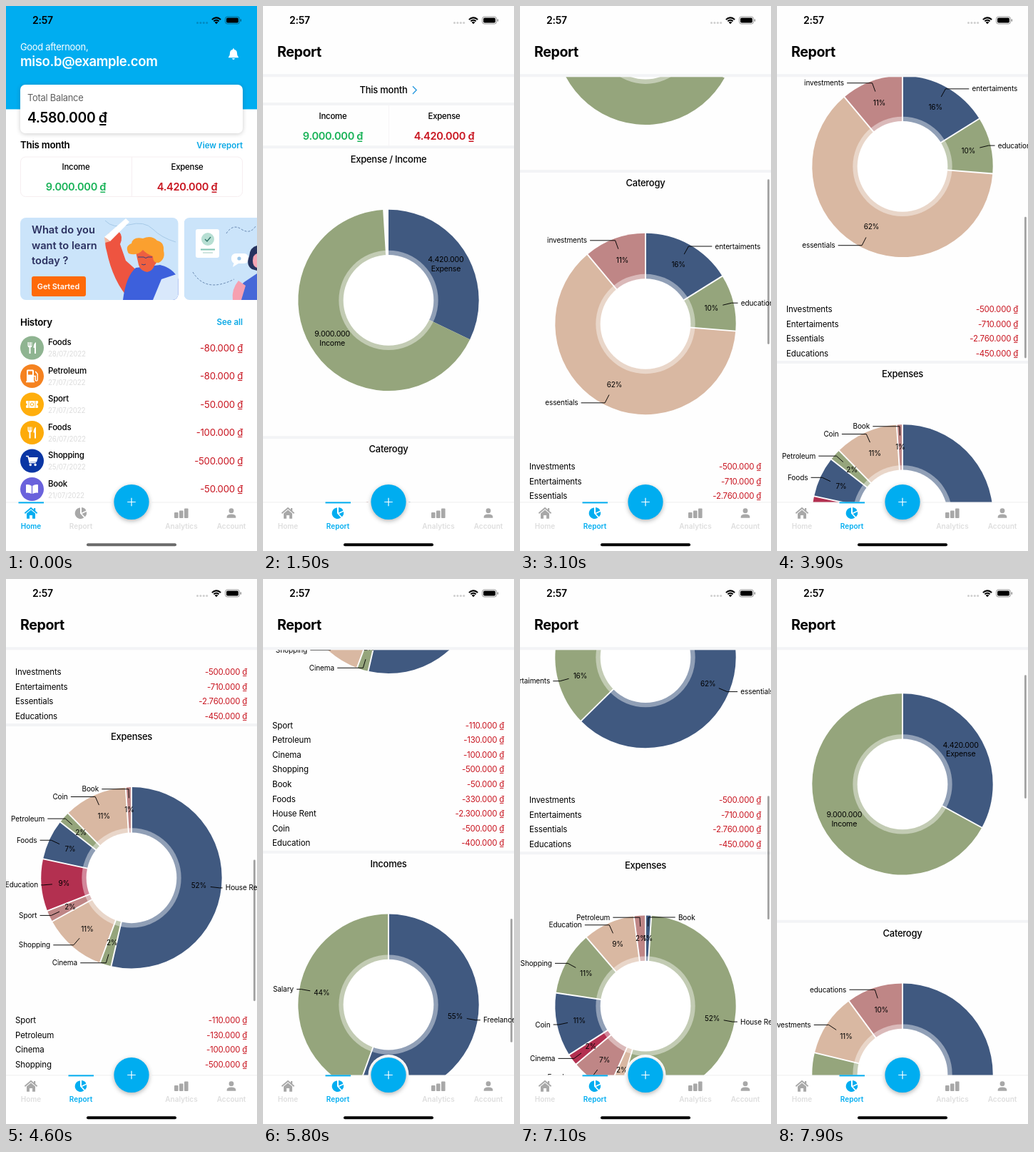
Write an HTML page with a canvas that moves like this. It is 352 px wide and 762 px high and loops after 8 s.

```html
<!DOCTYPE html>
<html lang="en">
<head>
<meta charset="utf-8">
<title>Budget app</title>
<style>
html, body { margin: 0; width: 100%; height: 100%; overflow: hidden; background: #fff; }
canvas { display: block; width: 352px; height: 762px; }
</style>
</head>
<body>
<canvas id="stage"></canvas>
<script>
const W = 352, H = 762, LOOP = 8000;
const SWITCH = 1100, REORDER = 6050;
const BLUE = '#00adf0', RED = '#c8141f', GREEN = '#18b257';
const PASTEL = ['#405980', '#95a57c', '#d9b8a2', '#bf8686', '#b33050'];

const canvas = document.getElementById('stage');
const c = canvas.getContext('2d');
const dpr = window.devicePixelRatio || 1;
canvas.width = W * dpr;
canvas.height = H * dpr;

// ---------- drawing helpers ----------
function text(s, x, y, size, color = '#000', weight = 400, align = 'left', track = -0.02) {
  c.font = `${weight} ${size}px Inter, Roboto, sans-serif`;
  c.letterSpacing = track * size + 'px';
  c.textAlign = align;
  c.fillStyle = color;
  c.fillText(s, x, y + size * 0.36);
}
function rect(x, y, w, h, color) {
  c.fillStyle = color;
  c.fillRect(x, y, w, h);
}
function box(x, y, w, h, r, color, stroke) {
  c.beginPath();
  c.roundRect(x, y, w, h, r);
  if (color) { c.fillStyle = color; c.fill(); }
  if (stroke) { c.strokeStyle = stroke; c.lineWidth = 1; c.stroke(); }
}
function disc(x, y, r, color) {
  c.beginPath();
  c.arc(x, y, r, 0, 7);
  c.fillStyle = color;
  c.fill();
}
function fill(d, color) {
  c.fillStyle = color;
  c.fill(new Path2D(d));
}
function line(d, color, width = 1) {
  c.strokeStyle = color;
  c.lineWidth = width;
  c.stroke(new Path2D(d));
}
function at(x, y, draw) {
  c.save();
  c.translate(x, y);
  draw();
  c.restore();
}
function shadow(blur, dy, color) {
  c.shadowBlur = blur * dpr;
  c.shadowOffsetY = dy * dpr;
  c.shadowColor = color;
}
function clip(x, y, w, h, draw, r = 0) {
  c.save();
  c.beginPath();
  c.roundRect(x, y, w, h, r);
  c.clip();
  draw();
  c.restore();
}

// ---------- icons, centred on 0,0 ----------
const icons = {
  fork() {
    fill('M-6 -8v5q0 2 2 2.5V8h2V-.5q2 -.5 2 -2.5v-5h-1v5h-1v-5h-1.6v5h-1v-5z', '#fff');
    fill('M5.5 -8q-3.5 2 -3.5 8h1.5v8h2z', '#fff');
  },
  pump() {
    box(-7.5, -9, 10, 17, 1.5, '#fff');
    rect(-5.5, -7, 6, 5, '#f58220');
    rect(-8.5, 7, 12, 1.8, '#fff');
    line('M2.5 0h2.2v5q0 1.6 1.5 1.6t1.5 -1.6v-8l-3 -3.5', '#fff', 1.4);
  },
  ticket() {
    box(-8.5, -5, 17, 10, 1, '#fff');
    disc(-8.5, 0, 1.6, '#ffae0c');
    disc(8.5, 0, 1.6, '#ffae0c');
    c.strokeStyle = '#ffae0c';
    c.lineWidth = 1;
    c.beginPath(); c.arc(0, 0, 2.2, 0, 7); c.stroke();
    line('M-4.5 -5v10M4.5 -5v10', '#ffae0c', 0.8);
  },
  cart() {
    line('M-8.5 -6.5h3l2.2 9h8.5', '#fff', 1.5);
    fill('M-5 -5h13.5l-2 6.5h-10z', '#fff');
    disc(-2.2, 5.5, 1.7, '#fff');
    disc(4.6, 5.5, 1.7, '#fff');
  },
  book() {
    fill('M-.6 -4.5Q-4 -7 -8.5 -6.2V5.2Q-4 4.6 -.6 6.6z', '#fff');
    fill('M.6 -4.5Q4 -7 8.5 -6.2V5.2Q4 4.6 .6 6.6z', '#fff');
  },
  home(color) {
    line('M-8.6 .2L0 -7l8.6 7.2', color, 1.8);
    rect(4, -7, 2.2, 4, color);
    fill('M-6 .6L0 -4.4L6 .6V7.8H2V3h-4v4.8h-4z', color);
  },
  chart(color) {
    fill('M-1 .4V-7.4A7.7 7.7 0 1 0 4.3 6.2z', color);
    fill('M1 -8A7.6 7.6 0 0 1 7.4 -3.6L1 -.6z', color);
    fill('M1.6 .9L7.9 -2A7.6 7.6 0 0 1 5.8 5.2z', color);
  },
  bars(color) {
    box(-10, -1, 5.6, 8, 1, color);
    box(-3, -3.5, 5.6, 10.5, 1, color);
    box(4, -6.5, 5.6, 13.5, 1, color);
  },
  person(color) {
    disc(0, -3.3, 3.4, color);
    fill('M-6.3 6.8V5Q-6 1.4 0 1.4T6.3 5V6.8z', color);
  }
};

// ---------- shared chrome ----------
function statusBar(dots) {
  text('2:57', 37, 20, 14, '#000', 600);
  for (let i = 0; i < 4; i++) disc(268.5 + i * 4.4, 23.5, 1.5, dots);
  [[8.1, 2.1], [4.8, 2]].forEach(([r, w]) => {
    c.beginPath();
    c.arc(295, 24.5, r, -Math.PI * 0.77, -Math.PI * 0.23);
    c.strokeStyle = '#000';
    c.lineWidth = w;
    c.stroke();
  });
  fill('M295 25.3l-2.4 -2.6q2.4 -2 4.8 0z', '#000');
  box(307.5, 15, 20, 10, 3, null, 'rgba(0,0,0,.4)');
  box(309, 16.5, 17, 7, 1.8, '#000');
  box(328.6, 18.2, 1.4, 3.6, 0.7, 'rgba(0,0,0,.45)');
}

const TABS = [['Home', 35, 'home'], ['Report', 105, 'chart'], ['Analytics', 246, 'bars'], ['Account', 316, 'person']];
function tabBar(active, grip) {
  rect(0, 694, W, 68, '#fff');
  rect(0, 693.5, W, 1, '#efefef');
  disc(176, 693.5, 28.5, '#fff');
  TABS.forEach(([name, x, icon], i) => {
    const on = i === active;
    if (on) rect(x - 17.5, 693.4, 35.5, 2, BLUE);
    at(x, 709, () => icons[icon](on ? BLUE : '#a8a8a8'));
    text(name, x, 727.5, 10, on ? BLUE : '#dedede', 600, 'center', 0);
  });
  c.save();
  shadow(6, 2, 'rgba(0,0,0,.3)');
  disc(176, 693.5, 24.6, BLUE);
  c.restore();
  line('M170.2 693.5h11.6M176 687.7v11.6', '#fff', 1.2);
  box(113, 751.2, 126, 4, 2, grip);
}

function totals(y) {
  text('Income', 98, y, 11.4, '#000', 500, 'center');
  text('Expense', 254, y, 11.4, '#000', 500, 'center');
  text('9.000.000 ₫', 98, y + 28, 14.6, GREEN, 600, 'center');
  text('4.420.000 ₫', 254, y + 28, 14.6, RED, 600, 'center');
}

// ---------- home ----------
function learnCard() {
  rect(20, 296, 222, 115, '#cbe4fa');
  line('M139 300Q150 312 172 306T206 312T238 330', '#9dc3e3', 0.8);
  // raised arm with a pencil
  fill('M141 342Q136 326 145 317L158 315Q165 322 160 333L168 356L186 372L182 411H174Q150 386 141 342z', '#ee5440');
  fill('M138 323L168 297L173 302L146 329z', '#fff');
  fill('M138 323L146 329L139 331z', '#f4b9a0');
  // shirt and sheet
  fill('M164 411Q168 378 182 366L216 362Q234 366 242 382V411z', '#3d60dc');
  fill('M206 411L218 382L242 374V411z', '#d9e8fb');
  // head
  fill('M182 344Q186 334 198 336L213 342Q215 356 208 363Q206 370 198 372Q188 370 186 362z', '#ee5f40');
  fill('M172 346Q166 336 176 332Q178 322 192 325Q204 320 212 328Q222 330 221 342Q224 354 214 359Q206 360 206 350Q196 346 192 341Q184 350 172 346z', '#fba02f');
  line('M185 351h8q3 3 6 0h6M190 361q3 2 6 0', '#33407e', 1);
  ['What do you', 'want to learn', 'today ?'].forEach((s, i) =>
    text(s, 36, 313 + i * 21.3, 14.6, '#2b3060', 600, 'left', 0));
  box(36, 378, 76, 28, 3, '#ff6a08');
  text('Get Started', 73.5, 392, 10.8, '#fff', 600, 'center', 0);
}
function secondCard() {
  rect(250, 296, 110, 115, '#cbe4fa');
  c.save();
  c.setLineDash([3, 2]);
  line('M309 318Q318 304 330 312T350 308M262 372Q280 402 320 382', '#4d6f9c', 0.8);
  c.restore();
  box(266, 312, 33, 40, 3, '#fff');
  disc(283, 326, 9, '#b7dfd3');
  line('M279 326l3 3l5 -6', '#33766a', 1.4);
  rect(273, 339.5, 20, 2, '#7fc4b2');
  rect(276, 344, 14, 2, '#cfe5df');
  box(316, 346, 24, 14, 6, '#fff');
  fill('M320 358l-2 7l8 -5z', '#fff');
  disc(327, 353, 2.6, '#9cc7ea');
  fill('M352 335Q342 337 341 350Q336 362 345 368L352 370z', '#26335f');
  fill('M352 346Q346 348 346 356T352 366z', '#f6a6b4');
  fill('M318 411Q322 396 334 386L352 374V411z', '#4668d8');
  fill('M318 411Q316 396 326 384L336 391L330 411z', '#f6a0b0');
}

const HISTORY = [
  ['Foods', '28/07/2022', '80.000', '#8fb491', 'fork'],
  ['Petroleum', '27/07/2022', '80.000', '#f58220', 'pump'],
  ['Sport', '27/07/2022', '50.000', '#ffae0c', 'ticket'],
  ['Foods', '26/07/2022', '100.000', '#fdab0a', 'fork'],
  ['Shopping', '25/07/2022', '500.000', '#0a36a4', 'cart'],
  ['Book', '21/07/2022', '50.000', '#6a62dc', 'book']
];

function home() {
  rect(0, 0, W, H, '#fff');
  rect(0, 0, W, 144.4, BLUE);
  statusBar('rgba(0,60,90,.3)');
  text('Good afternoon,', 20, 57, 12.9, '#fff');
  text('miso.b@example.com', 20, 77, 18.5, '#fff', 600);
  fill('M312 71.5q2 -1.5 2 -5.5q0 -4.5 4 -5.3q0 -1.4 1 -1.4t1 1.4q4 .8 4 5.3q0 4 2 5.5v.7h-14zM317 73.2h4q-.5 1.8 -2 1.8t-2 -1.8z', '#fff');

  c.save();
  shadow(6, 1, 'rgba(0,0,0,.2)');
  box(20, 110, 312, 68, 7, '#fff');
  c.restore();
  text('Total Balance', 30, 128.5, 12.9, '#606060');
  text('4.580.000 ₫', 30, 156.5, 19.4, '#000', 600);

  text('This month', 20, 194.5, 13.3, '#000', 600);
  text('View report', 332, 194.5, 11.5, '#0ba9e6', 600, 'right', 0);
  box(20.5, 211, 311, 55.5, 7, '#fff', '#f6eef0');
  rect(176, 211, 1, 56, '#f6eef0');
  totals(225);

  clip(20, 296, 221.5, 115, learnCard, 8);
  clip(249.5, 296, 130, 115, secondCard, 8);

  text('History', 20, 442, 13.3, '#000', 600);
  text('See all', 332, 442, 11.5, '#0ba9e6', 600, 'right', 0);
  HISTORY.forEach(([name, date, sum, color, icon], i) => {
    const y = 478 + i * 39.5;
    disc(36.5, y, 16.5, color);
    at(36.5, y, icons[icon]);
    text(name, 59, y - 8, 11.5, '#000', 500);
    text(date, 59, y + 8.7, 9.8, '#dcdcdc');
    text(`-${sum} ₫`, 332, y, 13.2, RED, 400, 'right');
  });
  tabBar(0, '#6a6a6a');
}

// ---------- data, amounts in thousands ----------
const TOTAL = { Expense: 4420, Income: 9000 };
const KINDS = { Investments: 500, Entertaiments: 710, Essentials: 2760, Educations: 450 };
const COSTS = { Sport: 110, Petroleum: 130, Cinema: 100, Shopping: 500, Book: 50, Foods: 330, 'House Rent': 2300, Coin: 500, Education: 400 };
const GAINS = { Salary: 4000, Freelance: 5000 };

// whole percents in the given order; the pies are drawn from these
function shares(from, names) {
  const sum = Object.values(from).reduce((a, b) => a + b);
  return names.split(',').map(n => [n, Math.floor(from[n] / sum * 100)]);
}
const lower = list => list.map(([n, v]) => [n.toLowerCase(), v]);

const kindPies = [
  lower(shares(KINDS, 'Entertaiments,Educations,Essentials,Investments')),
  lower(shares(KINDS, 'Essentials,Entertaiments,Investments,Educations'))
];
const costPies = [
  shares(COSTS, 'House Rent,Cinema,Shopping,Sport,Education,Foods,Petroleum,Coin,Book'),
  shares(COSTS, 'Book,House Rent,Sport,Foods,Cinema,Coin,Shopping,Education,Petroleum')
];
const gainPie = shares(GAINS, 'Freelance,Salary');
const amount = k => String(k * 1000).replace(/\B(?=(\d{3})+$)/g, '.');

// ---------- pies ----------
const R = 126.7, HOLE = R / 2;
const polar = (a, r) => [Math.sin(a) * r, -Math.cos(a) * r];

function insideLabel(s, x, y) {
  text(amount(s.value), x, y - 6.3, 10.6, '#000', 400, 'center');
  text(s.name, x, y + 6.3, 10.6, '#000', 400, 'center');
}
function outsideLabel(s, x, y) {
  text(s.value + '%', x, y, 10, '#000', 400, 'center');
  const [x1, y1] = polar(s.mid, R * 0.88), [x2, y2] = polar(s.mid, R * 0.98);
  const dir = x2 < 0 ? -1 : 1;
  const x3 = x2 + dir * 37.7 * Math.abs(Math.cos(s.mid));
  line(`M${x1} ${y1}L${x2} ${y2}H${x3}`, '#000', 0.95);
  text(s.name, x3 + dir * 4.2, y2, 10, '#000', 400, dir < 0 ? 'right' : 'left', -0.01);
}

function pie(cy, data, label = outsideLabel, grow = 1) {
  const sum = data.reduce((s, d) => s + d[1], 0);
  const full = Math.PI * 2;
  let acc = 0;
  const slices = data.map(([name, value], i) => {
    const from = acc / sum * full * grow;
    acc += value;
    const to = full * (acc === sum ? Math.pow(grow, 0.4) : acc / sum * grow);
    return { name, value, from, to, mid: (from + to) / 2, color: PASTEL[i % 5] };
  });
  at(176, cy, () => {
    for (const s of slices) {
      c.beginPath();
      c.moveTo(0, 0);
      c.arc(0, 0, R, s.from - Math.PI / 2, s.to - Math.PI / 2);
      c.fillStyle = s.color;
      c.fill();
    }
    if (grow === 1) for (const s of slices) {
      const [x, y] = polar(s.from, R + 1);
      line(`M0 0L${x} ${y}`, '#fff', 1.9);
    }
    disc(0, 0, R * 0.55, 'rgba(255,255,255,.42)');
    disc(0, 0, HOLE, '#fff');
    for (const s of slices) label(s, ...polar(s.mid, (R + HOLE) / 2));
  });
}

function rows(y, items, sign, color) {
  Object.entries(items).forEach(([name, k], i) => {
    const ry = y + i * 20.6;
    text(name, 13, ry, 11.5, '#000', 400, 'left', -0.01);
    text(`${sign}${amount(k)} ₫`, 338, ry, 11.5, color, 400, 'right');
  });
}
const band = y => rect(0, y, W, 4, '#f3f4f6');
const title = (s, y) => text(s, 176, y, 13, '#000', 500, 'center');

// ---------- report ----------
const SCROLL = [[1900, 0], [2300, 90], [2800, 315], [3100, 372], [3700, 505], [4200, 745], [4600, 886],
  [5100, 1090], [5500, 1225], [5800, 1298.5], [6150, 1450], [6350, 1435], [6600, 1235],
  [7100, 708], [7500, 395], [7900, 125], [8000, 85]];

// monotone cubic through the scroll points
function scrollAt(t) {
  const p = SCROLL;
  if (t <= p[0][0]) return 0;
  let i = 0;
  while (i < p.length - 2 && t > p[i + 1][0]) i++;
  const rate = k => (p[k + 1][1] - p[k][1]) / (p[k + 1][0] - p[k][0]);
  const slope = k => {
    if (k === 0) return 0;
    if (k === p.length - 1) return rate(k - 1);
    const a = rate(k - 1), b = rate(k);
    return a * b <= 0 ? 0 : 2 * a * b / (a + b);
  };
  const h = p[i + 1][0] - p[i][0], u = (t - p[i][0]) / h, v = 1 - u;
  return v * v * (1 + 2 * u) * p[i][1] + u * v * v * h * slope(i)
    + u * u * (3 - 2 * u) * p[i + 1][1] - u * u * v * h * slope(i + 1);
}

function content(t) {
  const grow = 1 - Math.pow(1 - Math.min(1, (t - SWITCH) / 565), 3);
  const order = t < REORDER ? 0 : 1;
  text('This month', 169, 117.5, 13, '#000', 500, 'center');
  line('M210 112.2l5.2 5.4l-5.2 5.4', '#2b9be0', 1.4);
  band(135);
  rect(176, 139, 1, 56, '#f7f5f7');
  totals(154);
  band(195.3);
  title('Expense / Income', 214.5);
  pie(411.4, Object.entries(TOTAL), insideLabel, grow);
  band(601.2);
  title('Caterogy', 619.5);
  pie(816.7, kindPies[order]);
  rows(1016.2, KINDS, '-', RED);
  band(1088.4);
  title('Expenses', 1107);
  pie(1304.2, costPies[order]);
  rows(1503.3, COSTS, '-', RED);
  band(1678.6);
  title('Incomes', 1697);
  pie(1894, gainPie);
  rows(2093, GAINS, '', GREEN);
}

function scrollBar(t, s) {
  const size = t < 3800 ? 1532 : t < 5200 ? 1788 : 2046;
  const h = 594 * 595 / size;
  box(347, 98 + (594 - h) * s / (size - 595), 2.8, h, 1.4, 'rgba(0,0,0,.36)');
}

function report(t) {
  rect(0, 0, W, H, '#fefefe');
  const s = scrollAt(t);
  clip(0, 99, W, 595, () => {
    at(0, -s, () => content(t));
    if (t >= 1950) scrollBar(t, s);
  });
  band(95.3);
  statusBar('#cfcfcf');
  text('Report', 20, 64, 19.6, '#000', 700);
  tabBar(1, '#000');
}

// ---------- loop ----------
const start = performance.now();
function frame() {
  const t = (performance.now() - start) % LOOP;
  c.setTransform(dpr, 0, 0, dpr, 0, 0);
  if (t < SWITCH) home();
  else report(t);
  requestAnimationFrame(frame);
}
frame();
</script>
</body>
</html>
```
